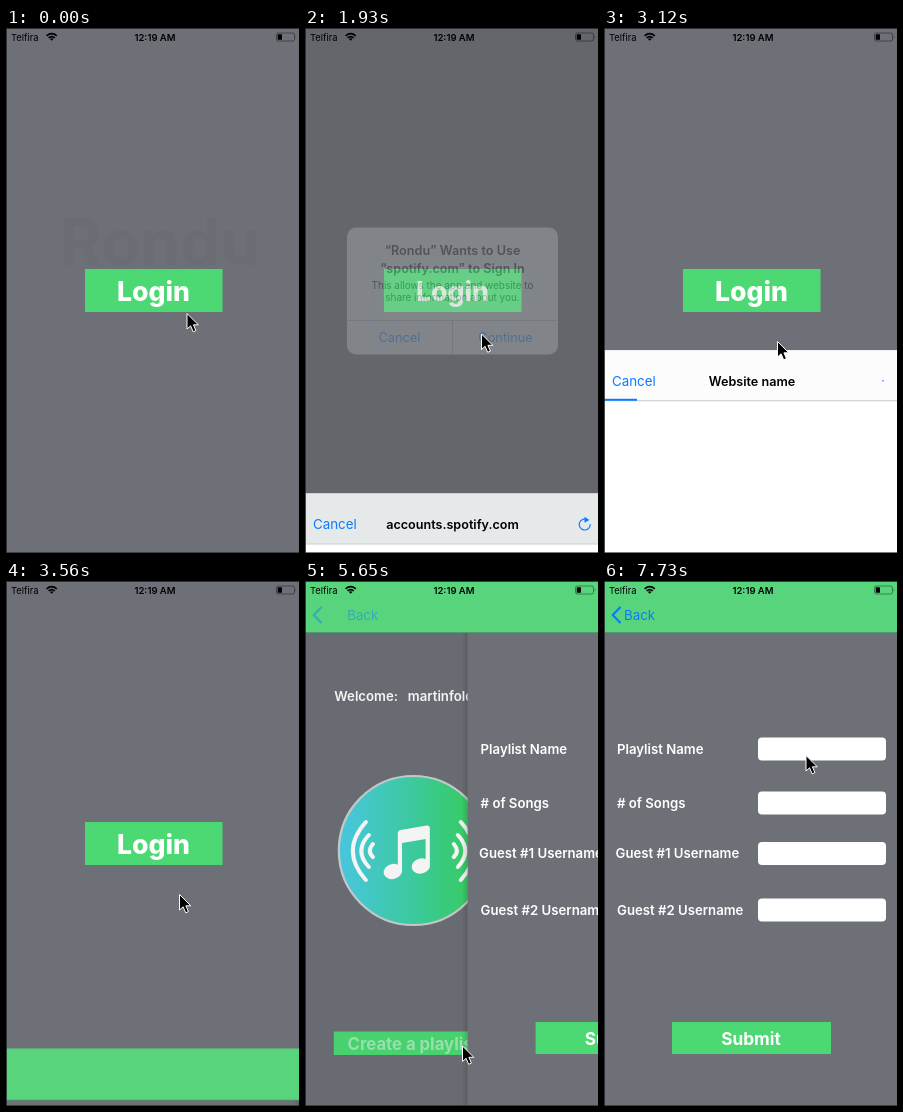
An HTML page that plays this animation: 293 px wide and 525 px high, repeating every 8000 ms.

```html
<!DOCTYPE html>
<html lang="en">
<head>
<meta charset="utf-8">
<title>Playlist app walkthrough</title>
<style>
  html, body { margin: 0; width: 100%; height: 100%; overflow: hidden; background: #6e7077; }
  svg { display: block; width: 293px; height: 525px; }
  text { font: 400 13.3px Inter, Roboto, "Liberation Sans", sans-serif; }
  .mid { text-anchor: middle; }
  .bg { fill: #6e7077; }
  .button { fill: #4cd974; }
  .white { fill: #fff; }
  .blue { fill: #0a7aff; }
  .ghost { font-size: 64px; font-weight: 700; fill: #686a71; }
  .login { font-size: 26.6px; font-weight: 800; }
  .action { font-size: 16.7px; font-weight: 700; }
  .submit { font-size: 17.2px; font-weight: 700; }
  .label { font-size: 13.2px; font-weight: 600; }
  .alert-title { font-size: 13.1px; font-weight: 600; fill: #22262a; }
  .alert-text { font-size: 10.3px; fill: #22262a; }
  .alert-button { fill: #2383ee; }
  .bar-title { font-size: 12.6px; font-weight: 600; }
  .status { font-size: 9.4px; }
  .clock { font-size: 9.5px; font-weight: 600; }
  .line { fill: none; stroke-linecap: round; stroke-linejoin: round; }
</style>
</head>
<body>
<svg viewBox="0 0 293 525">
  <defs>
    <linearGradient id="disc">
      <stop offset="0" stop-color="#4bcfe9"/>
      <stop offset=".5" stop-color="#3fd2a4"/>
      <stop offset="1" stop-color="#37d552"/>
    </linearGradient>
    <linearGradient id="edge">
      <stop offset="0" stop-opacity="0"/>
      <stop offset="1" stop-opacity=".14"/>
    </linearGradient>
    <filter id="soft" x="-40%" y="-80%" width="180%" height="260%"><feGaussianBlur stdDeviation="10"/></filter>
    <clipPath id="panel"><rect x="38" y="197" width="219" height="132" rx="10"/></clipPath>
    <g id="waves" class="line" stroke="#fff" stroke-width="4">
      <path d="M100 241Q74 270 100 299M103 254Q88 270 103 286M107 263Q101 270 107 276"/>
    </g>
    <ellipse id="head" class="white" rx="9.300" ry="7.600" transform="rotate(-14)"/>
  </defs>

  <!-- login screen -->
  <rect class="bg" width="293" height="525"/>
  <text id="ghost" class="ghost mid" x="154" y="237">Rondu</text>
  <rect class="button" x="79" y="241" width="137.500" height="43"/>
  <text class="login white mid" x="147.500" y="272.500">Login</text>
  <rect id="dim" width="293" height="525" opacity="0"/>

  <g id="alert" opacity="0">
    <g clip-path="url(#panel)">
      <rect x="38" y="197" width="219" height="132" fill="#cad0d4"/>
      <rect x="78" y="244" width="139" height="38" fill="#aef3c2" filter="url(#soft)"/>
    </g>
    <path d="M38 293.500H257M147.500 293.500V329" stroke="#9da4a7" fill="none"/>
    <text class="alert-title mid" x="147.500" y="226">“Rondu” Wants to Use</text>
    <text class="alert-title mid" x="147.500" y="244">“spotify.com” to Sign In</text>
    <text class="alert-text mid" x="147.500" y="260.500">This allows the app and website to</text>
    <text class="alert-text mid" x="147.500" y="273.300">share information about you.</text>
    <text class="alert-button mid" x="92.500" y="316">Cancel</text>
    <text class="alert-button mid" x="202.500" y="316">Continue</text>
  </g>

  <!-- web sheet -->
  <g id="sheet">
    <rect class="white" width="293" height="525"/>
    <rect id="header" width="293" height="50"/>
    <rect y="50" width="293" height="1" fill="#c6c8ca"/>
    <text class="blue" x="8" y="35.500">Cancel</text>
    <g id="loading">
      <text class="bar-title mid" x="147.500" y="35.500">accounts.spotify.com</text>
      <path class="line" d="M282.500 26.300A5.500 5.500 0 1 0 285.200 31" stroke="#0a7aff" stroke-width="1.200"/>
      <path class="blue" d="M279.500 23.300L284.300 26.500 279.500 29.200Z"/>
    </g>
    <g id="loaded">
      <text class="bar-title mid" x="148" y="35.500">Website name</text>
      <circle class="blue" cx="279" cy="30.500" r="1" opacity=".6"/>
    </g>
    <rect id="progress" class="blue" y="48.500" height="2"/>
  </g>

  <!-- signed-in app -->
  <g id="app">
    <g id="home">
      <rect class="bg" width="293" height="525"/>
      <text class="label white" x="68.500" y="120">Welcome:</text>
      <text class="label white" x="142" y="120">martinfolden27</text>
      <circle cx="147.500" cy="269.500" r="74.500" fill="url(#disc)" stroke="#cdd0d0" stroke-width="2.200"/>
      <use href="#waves"/>
      <use href="#waves" transform="matrix(-1 0 0 1 295 0)"/>
      <path class="white" d="M132 252Q132 249.500 135 249L161 244.500Q164 244 164 247V285H159.800V258L136.200 262V291H132Z"/>
      <use href="#head" x="0" transform="translate(127 290.500)"/>
      <use href="#head" x="0" transform="translate(155 285)"/>
      <rect class="button" x="68" y="450.500" width="159" height="23.500"/>
      <text id="create" class="action white mid" x="147.300" y="468.700">Create a playlist</text>
      <rect id="shade" width="293" height="525" opacity="0"/>
    </g>
    <g id="form">
      <rect id="shadow" x="-6" width="6" height="525" fill="url(#edge)"/>
      <rect class="bg" width="293" height="525"/>
      <g id="rows"></g>
      <rect id="caret" x="159" y="160" width="1.800" height="15" fill="#3f6bef"/>
      <rect class="button" x="68" y="441" width="159" height="32"/>
      <text class="submit white mid" x="147" y="463.500">Submit</text>
    </g>
    <rect width="293" height="51.500" fill="#58d57c"/>
    <rect y="51.200" width="293" height=".8" fill="#4d9a66"/>
    <g id="nav" class="blue">
      <path class="line" d="M16 26.500L8.700 34 16 41.500" stroke="#0a7aff" stroke-width="2.200"/>
      <text id="back" x="20" y="38.800">Back</text>
    </g>
  </g>

  <!-- status bar -->
  <text class="status" x="5" y="12.500">Telfira</text>
  <path d="M40.600 7.900Q45.700 3.500 50.800 7.900M42.600 9.900Q45.700 7.300 48.800 9.900" fill="none" stroke="#000" stroke-width="1.700"/>
  <path d="M43.900 10.900Q45.700 9.600 47.500 10.900L45.700 12.800Z"/>
  <text class="clock mid" x="149" y="12.500">12:19 AM</text>
  <rect x="270.500" y="5" width="18" height="8" rx="1.800" fill="none" stroke="#000" stroke-opacity=".45" stroke-width=".9"/>
  <rect x="271.700" y="6.200" width="4.300" height="5.600" rx=".6"/>
  <path d="M289.700 7.500Q291.200 9 289.700 10.500Z" opacity=".5"/>

  <path d="M0 .5H293M.5 0V525" stroke="#222428" stroke-opacity=".8" fill="none"/>
  <path d="M0 524.500H293" stroke="#222428" stroke-opacity=".6"/>
  <path id="cursor" d="M0 0V15.500L3.600 12.300 6.200 18.300 8.900 17.100 6.400 11.300H11.300Z" stroke="#fff" stroke-linejoin="round"/>
</svg>
<script>
  const LOOP = 8000, TICK = 148.6, WIDTH = 293, HEIGHT = 525;
  const el = id => document.getElementById(id);
  const set = (id, name, value) => el(id).setAttribute(name, value);
  const fade = (id, value) => set(id, "opacity", value);
  const move = (id, x, y) => set(id, "transform", `translate(${x} ${y})`);

  // Smooth progress from 0 to 1 between two times.
  function ease(t, from, to) {
    const p = Math.min(1, Math.max(0, (t - from) / (to - from)));
    return p * p * (3 - 2 * p);
  }

  function addRow(name, y, x = 13) {
    el("rows").innerHTML += `<text class="label white" x="${x}" y="${y + 4.7}">${name}</text>
      <rect class="white" x="154" y="${y - 11.5}" width="128" height="23" rx="4"/>`;
  }
  addRow("Playlist Name", 168);
  addRow("# of Songs", 222);
  addRow("Guest #1 Username", 272.5, 11.5);
  addRow("Guest #2 Username", 329);

  function drawLogin(t) {
    const opening = ease(t, 500, 850), closing = ease(t, 1700, 2060);
    const shown = opening - closing;
    const size = 1.15 - .15 * opening - .05 * closing;
    fade("ghost", t < TICK * 2 ? .4 : 0);
    fade("dim", .31 * shown);
    fade("alert", shown);
    set("alert", "transform", `translate(147.5 263) scale(${size}) translate(-147.5 -263)`);
  }

  function drawSheet(t) {
    const up = ease(t, 1827, 2327) - ease(t, 2890, 3290);
    const done = t > 2660;
    move("sheet", 0, HEIGHT * (1 - up));
    fade("loading", done ? 0 : 1);
    fade("loaded", done ? 1 : 0);
    set("header", "fill", done ? "#fcfcfc" : "#e6e9ea");
    set("progress", "width", 33 * ease(t, 2330, 2670));
  }

  function drawApp(t) {
    const push = ease(t, 5480, 5840);
    move("app", 0, HEIGHT * (1 - ease(t, 3480, 3900)));
    move("home", -88 * push, 0);
    move("form", WIDTH * (1 - push), 0);
    move("back", 40 * (1 - push), 0);
    fade("shade", .1 * push);
    fade("shadow", push < 1 ? 1 : 0);
    fade("nav", push);
    fade("create", t > 5490 ? .45 : 1);
    fade("caret", t > 7130 ? 1 - ease(t, 7440, 7720) : 0);
  }

  function drawCursor(t) {
    let x = 181, y = 285.5;
    const glide = (from, to, nextX, nextY) => {
      const p = ease(t, from, to);
      x += (nextX - x) * p;
      y += (nextY - y) * p;
    };
    glide(290, 600, 171, 263);
    glide(1190, 1480, 176.5, 306);
    glide(1932, 3120, 173.5, 313.5);
    glide(4010, 4310, 157.5, 437);
    glide(4458, 5050, 157.5, 465);
    glide(6240, 6540, 202, 174.5);
    move("cursor", x, y);
  }

  const start = performance.now();
  function frame() {
    const now = (performance.now() - start) % LOOP;
    const t = Math.floor((now + 6) / TICK) * TICK;
    drawLogin(t);
    drawSheet(t);
    drawApp(t);
    drawCursor(t);
    requestAnimationFrame(frame);
  }
  frame();
</script>
</body>
</html>
```
